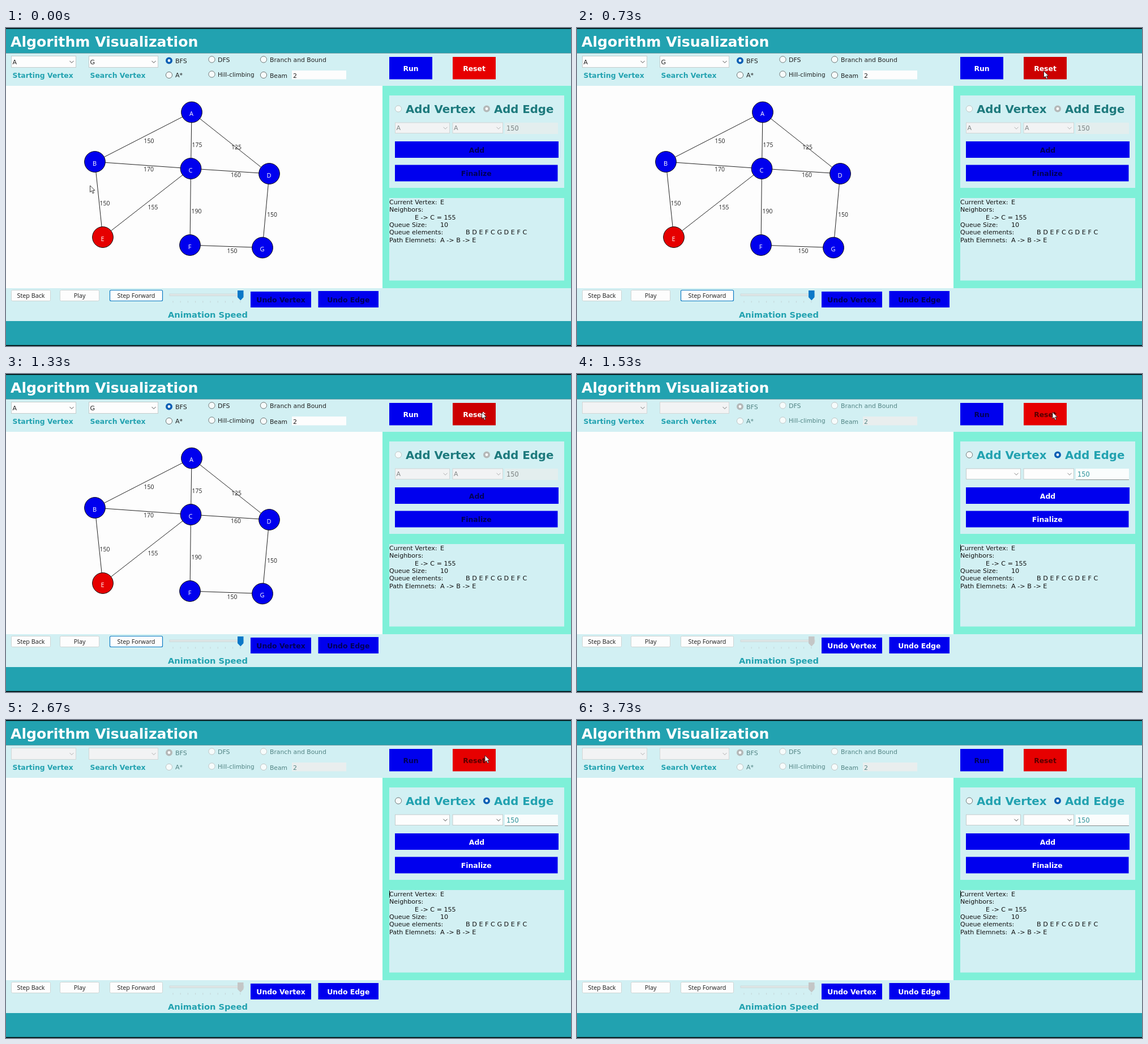
An HTML page for the animation above (3760 ms loop, 998 by 561 pixels).

```html
<!DOCTYPE html>
<html lang="en">
<head>
<meta charset="utf-8">
<title>Algorithm Visualization</title>
<style>
html, body { margin: 0; width: 100%; height: 100%; overflow: hidden; background: #000; }
svg { display: block; width: 998px; height: 561px; }
text { font-family: "DejaVu Sans", Verdana, sans-serif; white-space: pre; }
.ui { font-family: "Open Sans", "Noto Sans", sans-serif; }
.b { font-weight: bold; }
</style>
</head>
<body>
<svg id="stage" viewBox="0 0 998 561"></svg>
<script>
const LOOP = 3760, RESET = 1400, LEAVE = 3200, FADE = 300, BLINK = 530;
const TEAL = '#22a2b0', PALE = '#d2f0f3', BLUE = '#0000ee', RED = '#e60000', HOT = '#cc0000';

const rect = (x, y, x2, y2, fill, more = '') =>
  `<rect x="${x}" y="${y}" width="${x2 - x}" height="${y2 - y}" fill="${fill}" ${more}/>`;
const text = (x, y, s, size, fill, more = '') =>
  `<text x="${x}" y="${y}" font-size="${size}" fill="${fill}" ${more}>${s.replace(/>/g, '&gt;')}</text>`;
const bold = (x, y, s, size, fill, more = '') => text(x, y, s, size, fill, `class="b" ${more}`);
const line = (x, y, x2, y2, color, w = 1) =>
  `<line x1="${x}" y1="${y}" x2="${x2}" y2="${y2}" stroke="${color}" stroke-width="${w}"/>`;
const MID = 'text-anchor="middle"';

function button(x, y, x2, y2, label, on, fill = BLUE, id = '') {
  const ink = on ? '#fff' : fill === BLUE ? '#000058' : '#580000';
  return rect(x, y, x2, y2, fill, id && `id="${id}"`) +
    bold((x + x2) / 2, (y + y2) / 2 + 5.2, label, 12.4, ink, MID);
}

function radio(x, y, picked, on) {
  if (picked) return `<circle cx="${x}" cy="${y}" r="4.2" fill="#fff" stroke="${on ? '#0a5fb4' : '#b4b8b8'}" stroke-width="3.6"/>`;
  return `<circle cx="${x}" cy="${y}" r="5.6" fill="#f6fbfb" stroke="${on ? '#6f7777' : '#c0c6c6'}"/>`;
}

function combo(x, y, x2, y2, value, on, kind) {
  const cx = x2 - 8, cy = (y + y2) / 2;
  return rect(x + .5, y + .5, x2 - .5, y2 - .5, on ? '#fdfdfd' : '#f2f3f4', `stroke="${on ? '#c4cccc' : '#d2d6d6'}"`) +
    text(x + 2.5, cy + 4.2, value, 11, on ? '#222' : '#808585') +
    `<path class="${kind}" d="M${cx - 3.5} ${cy - 1.5}l3.5 3.5l3.5 -3.5" fill="none" stroke="#4c4c4c"/>`;
}

function frameParts() {
  const stepButton = (x, x2, s) =>
    rect(x + .5, 462.5, x2 - .5, 481.5, '#fdfdfd', 'rx="2" stroke="#cdd4d4"') +
    text((x + x2) / 2, 476, s, 10.8, '#1a1a1a', `class="ui" ${MID}`);
  const info = [
    [677, 'Current Vertex:'], [677, 'Neighbors:'], [722, 'E -> C = 155'],
    [677, 'Queue Size:'], [677, 'Queue elements:'], [677, 'Path Elemnets:']
  ].map(([x, s], i) => text(x, 311 + i * 13.3, s, 11.1, '#111')).join('');
  const values = [[767, 0, 'E'], [767, 3, '10'], [812, 4, 'B D E F C G D E F C'], [767, 5, 'A -> B -> E']]
    .map(([x, i, s]) => text(x, 311 + i * 13.3, s, 11.2, '#111')).join('');
  return rect(0, 0, 998, 561, '#000') +
    rect(0, 1.5, 998, 44.5, TEAL) + rect(0, 44.5, 998, 102, PALE) +
    rect(0, 102, 665, 459, '#fdfdfd') + rect(665, 102, 998, 459, '#7ef0d8') +
    rect(0, 459, 998, 517, PALE) + rect(0, 517, 998, 559.5, TEAL) +
    rect(677, 119, 986, 282, PALE) + rect(677, 300, 986, 445.5, PALE) +
    bold(8, 32.8, 'Algorithm Visualization', 25.15, '#fff') +
    bold(11.5, 87.5, 'Starting Vertex', 12.4, TEAL) +
    bold(148.5, 87.5, 'Search Vertex', 12.4, TEAL) +
    bold(286, 511, 'Animation Speed', 14.65, TEAL) +
    stepButton(9, 79, 'Step Back') + stepButton(95, 165, 'Play') + stepButton(183, 277, 'Step Forward') +
    info + values;
}

// Widgets that change when the graph is cleared; live = the search can run.
function controls(live) {
  const ink = live ? '#222' : '#528484', head = live ? '#1d7a7d' : TEAL;
  const options = [
    [288, 57.5, 299, 62, 'BFS', 11], [288, 83, 299, 87.3, 'A*', 11],
    [363.5, 55.5, 374, 60, 'DFS', 11], [363.5, 81.5, 374, 86, 'Hill-climbing', 10.4],
    [455, 55.5, 466, 60, 'Branch and Bound', 10.8], [455, 83, 466, 87.5, 'Beam', 10.75]
  ].map(([cx, cy, x, y, s, size], i) => radio(cx, cy, !i, live) + text(x, y, s, size, ink)).join('');
  let ticks = '';
  for (let i = 0; i < 10; i++) ticks += line(295 + i * 13.2, 481.5, 295 + i * 13.2, 484.5, '#c3d2d4');
  const kind = live ? '' : 'closing', open = live ? 'dim' : 'opening';
  return combo(9, 49, 124, 70, live ? 'A' : '', live, kind) +
    combo(146, 49, 269, 70, live ? 'G' : '', live, kind) + options +
    rect(505, 75, 601, 90.5, live ? '#fdfdfd' : '#e9eeee') + text(507, 87.5, '2', 11, ink) +
    button(677, 51, 753, 90.5, 'Run', live) +
    button(789, 51, 865, 90.5, 'Reset', live, RED, live ? 'reset' : '') +
    radio(693, 142.5, false, !live) + radio(849, 142.5, true, !live) +
    bold(706, 150, 'Add Vertex', 19.8, head) + bold(862, 150, 'Add Edge', 19.7, head) +
    combo(687, 166.5, 784, 186, live ? 'A' : '', !live, open) +
    combo(788.5, 166.5, 878, 186, live ? 'A' : '', !live, open) +
    rect(881, 167, 975, 187, live ? '#e3eeee' : '#fafdfd') +
    (live ? '' : line(881, 186.5, 975, 186.5, '#858d8d')) +
    text(884, 181, '150', 11.4, live ? '#7a8282' : '#2c9199') +
    button(687, 200, 976, 229, 'Add', !live) +
    button(687, 241.5, 974.5, 270.5, 'Finalize', !live) +
    button(432, 465, 539, 493, 'Undo Vertex', !live) +
    button(551.5, 464, 658, 493, 'Undo Edge', !live) +
    rect(289, 469, 420, 472.5, '#dfe6e6', 'stroke="#c6d0d0" stroke-width=".6"') + ticks +
    `<path d="M409 463h10.5v12l-5.2 5.5l-5.3 -5.5z" fill="${live ? '#0a78c8' : '#c4c6c6'}"/>` +
    (live ? rect(183.5, 462.5, 276.5, 481.5, 'none', 'rx="2" stroke="#0b7bc4" stroke-width="1.2"') : '');
}

function graph() {
  const at = {
    A: [328, 148.5], B: [157, 236], C: [326.5, 248], D: [465, 257],
    E: [171, 369], F: [325, 383], G: [453, 387.5]
  };
  const edges = [
    ['AB', 150, 243.5, 203], ['AC', 175, 328.5, 210], ['AD', 125, 398, 214], ['BC', 170, 243, 253],
    ['CD', 160, 397, 263], ['BE', 150, 165.5, 313], ['CE', 155, 250.5, 320], ['CF', 190, 327.5, 327],
    ['DG', 150, 461, 333], ['FG', 150, 390.5, 397]
  ];
  return edges.map(([[a, b], w, x, y]) => line(...at[a], ...at[b], '#222') +
      text(x, y, String(w), 10.4, '#222', 'class="ui"')).join('') +
    Object.entries(at).map(([s, [x, y]]) =>
      `<circle cx="${x}" cy="${y}" r="18.4" fill="${s === 'E' ? RED : BLUE}" stroke="#111"/>` +
      text(x - .5, y + 6.8, s, 11, '#fff', `class="ui" ${MID}`)).join('');
}

const stage = document.getElementById('stage');
stage.innerHTML = frameParts() +
  `<g id="before">${controls(true)}${graph()}</g><g id="after">${controls(false)}</g>` +
  `<path id="caret" d="M677.5 301v12.5" stroke="#111"/>` +
  `<path id="mouse" d="M0 0v11.6l2.7 -2.5l2 4.7l2 -.9l-2 -4.5h3.7z" fill="#fff" stroke="#222" stroke-width=".9"/>`;

const $ = id => document.getElementById(id);
const before = $('before'), after = $('after'), caret = $('caret'), mouse = $('mouse'), reset = $('reset');
const closing = stage.querySelectorAll('.closing'), opening = stage.querySelectorAll('.opening');
stage.querySelectorAll('.dim').forEach(e => e.setAttribute('opacity', .4));

const path = [[0, 148.5, 278], [230, 808, 97.5], [730, 824.5, 76], [1130, 841, 67.5],
  [1530, 840, 67.5], [2670, 846, 62.5], [LOOP, 846, 62.5]];

function pointer(t) {
  const i = path.findIndex(p => p[0] > t), a = path[i - 1], b = path[i];
  const u = (t - a[0]) / (b[0] - a[0]);
  const k = i === 2 ? 1 - (1 - u) ** 2 : u * u * (3 - 2 * u);
  return [a[1] + (b[1] - a[1]) * k, a[2] + (b[2] - a[2]) * k];
}

const show = (el, on) => el.setAttribute('visibility', on ? 'visible' : 'hidden');
const alpha = (list, v) => list.forEach(e => e.setAttribute('opacity', v));

function draw(t) {
  const live = t < RESET, [x, y] = pointer(t);
  const fade = Math.min(1, Math.max(0, (t - RESET) / FADE));
  show(before, live);
  show(after, !live);
  show(caret, !live && Math.floor((t - RESET) / BLINK) % 2 === 0);
  show(mouse, t < LEAVE);
  mouse.setAttribute('transform', `translate(${x} ${y})`);
  reset.setAttribute('fill', x > 789 && x < 865 && y > 51 && y < 90 ? HOT : RED);
  alpha(closing, 1 - .6 * fade);
  alpha(opening, .4 + .6 * fade);
}

function tick() {
  draw(performance.now() % LOOP);
  requestAnimationFrame(tick);
}
tick();
</script>
</body>
</html>
```
